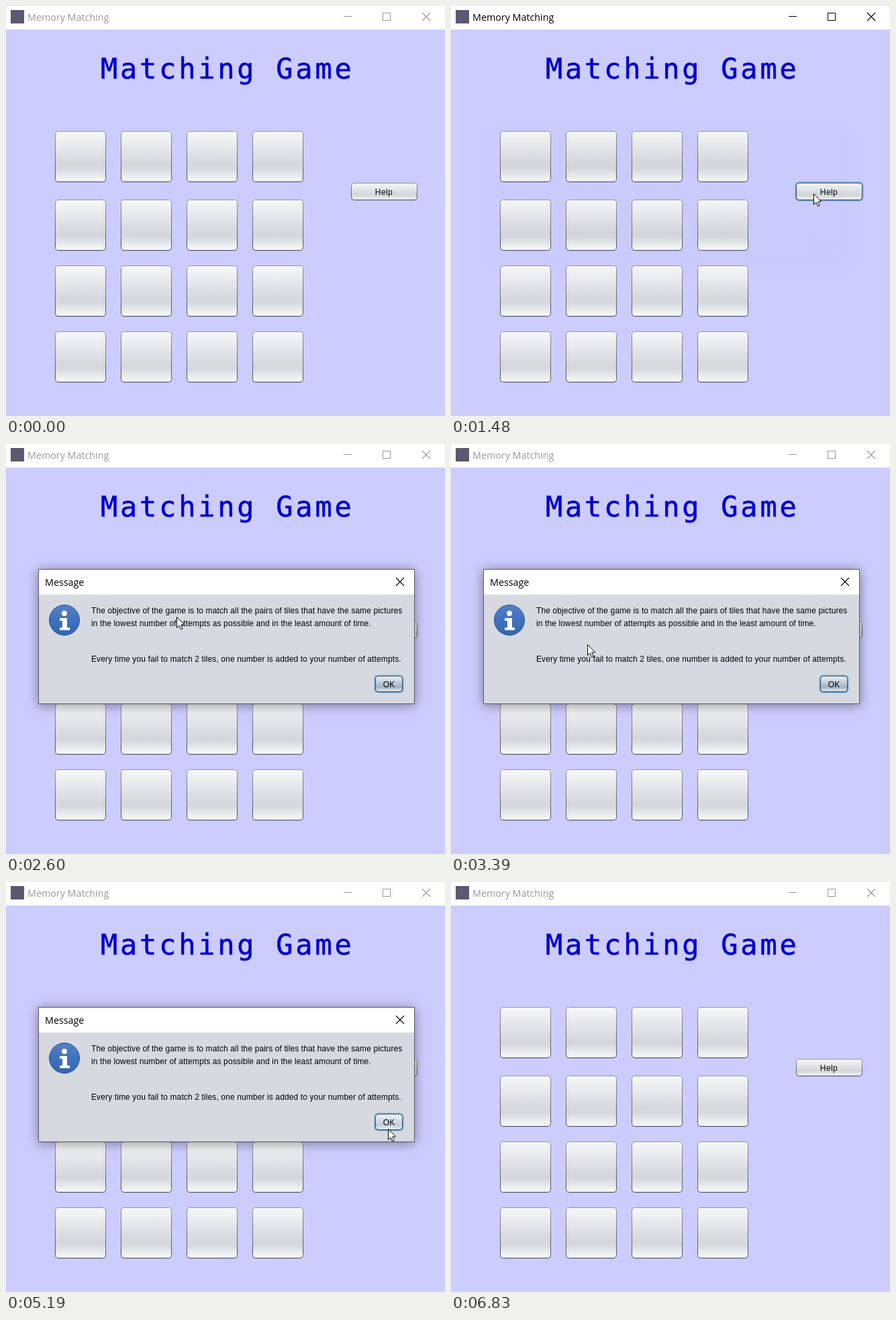
Animation of 654 by 610 pixels, one loop 6860 ms. Source, as an HTML page with a canvas:

```html
<!DOCTYPE html>
<html lang="en">
<head>
<meta charset="utf-8">
<title>Memory Matching</title>
<style>
html, body { margin: 0; width: 100%; height: 100%; overflow: hidden; background: #ccccff; }
canvas { display: block; }
</style>
</head>
<body>
<canvas id="stage" width="654" height="610"></canvas>
<script>
const ctx = document.getElementById('stage').getContext('2d');
const LOOP = 6860;
const UI = '14.3px "Open Sans", "Noto Sans", sans-serif';
const BODY = '12px "Liberation Sans", Arial, sans-serif';
const MONO = '42px "DejaVu Sans Mono", monospace';

const HELP = { x: 514, y: 263, w: 99, h: 26 };
const OK = { x: 550, y: 345, w: 41, h: 24 };

// The pointer rests between moves; each move eases to its point, bow bends it downwards
const ENTRY = { x: 506, y: 598 };
const MOVES = [
  { from: 100, to: 710, x: 540, y: 279 },
  { from: 1850, to: 2300, x: 29, y: 248 },
  { from: 2300, to: 2870, x: 445, y: 264 },
  { from: 2870, to: 3190, x: 93, y: 304 },
  { from: 3265, to: 3630, x: 494, y: 281 },
  { from: 3630, to: 4060, x: 120, y: 328 },
  { from: 4060, to: 4650, x: 461, y: 329, bow: 13 },
  { from: 4650, to: 5190, x: 569, y: 367 },
  { from: 6130, to: 6400, x: 656, y: 562 }
];

// Base colour of each button state
const TONES = {
  normal: [212, 215, 220],
  hover: [230, 233, 238],
  pressed: [131, 148, 168],
  primary: [166, 182, 199],
  primaryHover: [192, 207, 221]
};

const progress = (t, from, to) => Math.max(0, Math.min(1, (t - from) / (to - from)));
const ease = u => u * u * (3 - 2 * u);
const within = (t, from, to) => t >= from && t < to;
const over = (p, r) => within(p.x, r.x, r.x + r.w) && within(p.y, r.y, r.y + r.h);
const tint = (rgb, white) => `rgb(${rgb.map(c => Math.round(c + (255 - c) * white))})`;

function pointerAt(t) {
  let { x, y } = ENTRY;
  for (const m of MOVES) {
    if (t < m.from) break;
    const u = progress(t, m.from, m.to), v = ease(u);
    x += (m.x - x) * v;
    y += (m.y - y) * v + (m.bow || 0) * 4 * u * (1 - u);
  }
  return { x: Math.round(x), y: Math.round(y) };
}

function text(str, x, y, font, color, spacing = 0, align = 'left') {
  ctx.font = font;
  ctx.fillStyle = color;
  ctx.textAlign = align;
  ctx.letterSpacing = spacing + 'px';
  ctx.fillText(str, x, y);
}

function line(x1, y1, x2, y2, color, width = 1) {
  ctx.strokeStyle = color;
  ctx.lineWidth = width;
  ctx.beginPath();
  ctx.moveTo(x1, y1);
  ctx.lineTo(x2, y2);
  ctx.stroke();
}

function closeMark(x, y, color) {
  line(x, y, x + 12, y + 12, color, 1.1);
  line(x + 12, y, x, y + 12, color, 1.1);
}

function rounded(x, y, w, h, r) {
  ctx.beginPath();
  ctx.roundRect(x, y, w, h, r);
}

function vertical(y, h, stops) {
  const g = ctx.createLinearGradient(0, y, 0, y + h);
  for (const [at, color] of stops) g.addColorStop(at, color);
  return g;
}

function button({ x, y, w, h }, look, ring) {
  const tone = TONES[look];
  if (ring) {
    rounded(x - 1.5, y - 1.5, w + 3, h + 3, 6);
    ctx.fillStyle = '#73a4d1';
    ctx.fill();
  } else {
    line(x + 3, y + h + 0.5, x + w - 3, y + h + 0.5, 'rgba(60, 65, 90, 0.12)');
  }
  rounded(x + 0.5, y + 0.5, w - 1, h - 1, 4);
  ctx.fillStyle = vertical(y, h, [
    [0, tint(tone, 0.82)], [0.45, tint(tone, 0.26)], [0.66, tint(tone, 0)],
    [0.72, tint(tone, 0)], [1, tint(tone, 0.9)]
  ]);
  ctx.fill();
  ctx.strokeStyle = vertical(y, h, ring ? [[0, '#4d6278'], [1, '#2a3b4e']] : [[0, '#92949f'], [1, '#4b4f5a']]);
  ctx.lineWidth = 1;
  ctx.stroke();
}

function mainWindow(active, helpLook) {
  ctx.fillStyle = '#ccccff';
  ctx.fillRect(0, 0, 654, 610);
  ctx.fillStyle = '#ffffff';
  ctx.fillRect(0, 0, 654, 35);
  ctx.fillStyle = '#5d5870';
  ctx.fillRect(7, 6, 20, 20);

  const ink = active ? '#000000' : '#999999';
  text('Memory Matching', 32, 22, UI, ink);
  line(503, 15.5, 515, 15.5, ink);
  ctx.strokeRect(561.5, 10.5, 11, 11);
  closeMark(620, 10, ink);

  text('Matching Game', 141, 108, MONO, '#0000cc', 3.75);
  ctx.strokeStyle = '#0000cc';
  ctx.lineWidth = 0.6;
  ctx.strokeText('Matching Game', 141, 108);

  for (let row = 0; row < 4; row++) {
    for (let col = 0; col < 4; col++) {
      const y = row ? 190 + 98 * row : 186;
      button({ x: 73 + 98 * col, y, w: 76, h: 76 }, 'normal');
    }
  }
  button(HELP, helpLook, active);
  text('Help', 563, 281, BODY, '#000000', 0.4, 'center');
}

function infoIcon() {
  ctx.beginPath();
  ctx.arc(87, 262, 22.5, 0, Math.PI * 2);
  ctx.fillStyle = vertical(239, 46, [[0, '#5580c4'], [0.5, '#3f72bd'], [1, '#3565b0']]);
  ctx.fill();
  ctx.strokeStyle = '#24509a';
  ctx.lineWidth = 1;
  ctx.stroke();
  ctx.fillStyle = '#ffffff';
  ctx.beginPath();
  ctx.arc(87, 252, 4, 0, Math.PI * 2);
  ctx.fill();
  ctx.fillRect(80, 259, 11, 4);
  ctx.fillRect(84, 259, 7, 16);
  ctx.fillRect(80, 273, 15, 4);
}

function dialog(show, okLook) {
  ctx.save();
  ctx.globalAlpha = show;
  const scale = 0.92 + 0.08 * show;
  ctx.translate(328.5, 286.5);
  ctx.scale(scale, scale);
  ctx.translate(-328.5, -286.5);

  ctx.save();
  ctx.shadowColor = 'rgba(0, 0, 0, 0.42)';
  ctx.shadowBlur = 16;
  ctx.shadowOffsetY = 2;
  ctx.fillStyle = '#5a5c62';
  ctx.fillRect(48, 186, 561, 201);
  ctx.restore();

  ctx.fillStyle = '#ffffff';
  ctx.fillRect(49, 187, 559, 37);
  ctx.fillStyle = '#d6d9df';
  ctx.fillRect(49, 224, 559, 162);
  text('Message', 58, 211, UI, '#000000');
  closeMark(581, 199, '#000000');
  infoIcon();

  const say = (str, y) => text(str, 127, y, BODY, '#000000', 0.12);
  say('The objective of the game is to match all the pairs of tiles that have the same pictures', 252);
  say('in the lowest number of attempts as possible and in the least amount of time.', 271);
  say('Every time you fail to match 2 tiles, one number is added to your number of attempts.', 324);

  button(OK, okLook, true);
  text('OK', 570.5, 362, BODY, '#000000', 0, 'center');
  ctx.restore();
}

function pointer(p) {
  ctx.save();
  ctx.translate(p.x + 0.5, p.y + 0.5);
  const arrow = new Path2D('M0 0V16L3.6 12.6L6 18.2L8.6 17.1L6.2 11.6L11 11.2Z');
  ctx.fillStyle = '#ffffff';
  ctx.fill(arrow);
  ctx.strokeStyle = '#000000';
  ctx.lineWidth = 1;
  ctx.stroke(arrow);
  ctx.restore();
}

function draw(t) {
  const p = pointerAt(t);
  const visible = within(t, 100, 6400);
  const show = progress(t, 1480, 1650) * (1 - progress(t, 6010, 6130));
  const active = within(t, 1300, 1500) || within(t, 6010, 6830);

  let helpLook = visible && show === 0 && over(p, HELP) ? 'hover' : 'normal';
  if (within(t, 1300, 1400)) helpLook = 'pressed';
  mainWindow(active, helpLook);

  if (show > 0) {
    let okLook = over(p, OK) ? 'primaryHover' : 'primary';
    if (within(t, 5930, 5990)) okLook = 'pressed';
    dialog(show, okLook);
  }
  if (visible) pointer(p);
}

const begin = performance.now();
function frame() {
  draw((performance.now() - begin) % LOOP);
  requestAnimationFrame(frame);
}
frame();
</script>
</body>
</html>
```
